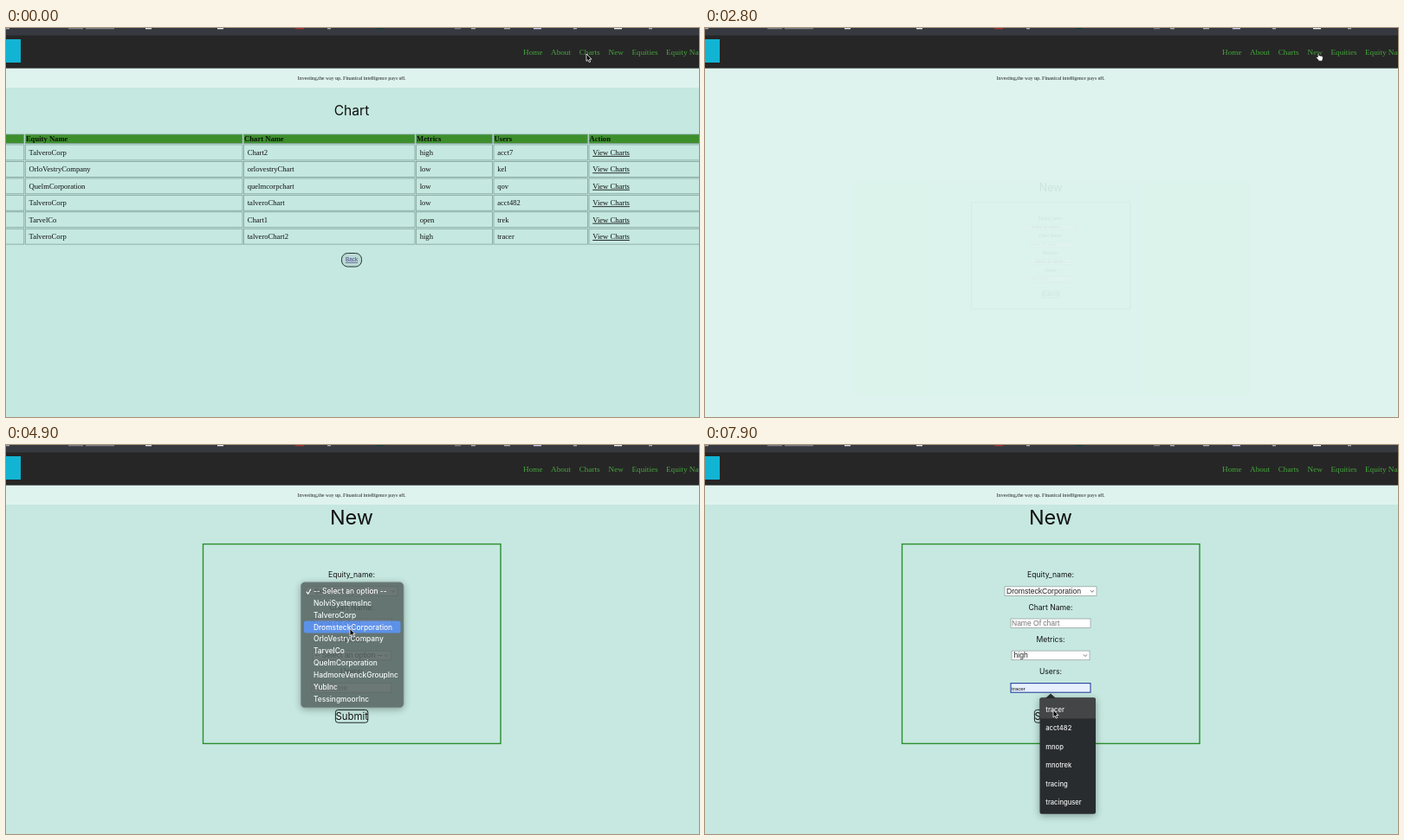
Recreate the animation shown at these times as an HTML page. Size 800 px wide and 450 px high, loop 8000 ms.

```html
<!DOCTYPE html>
<html lang="en">
<head>
<meta charset="utf-8">
<title>Equity charts</title>
<style>
html, body { margin: 0; width: 100%; height: 100%; overflow: hidden; background: #c5e8e0; }
svg { display: block; width: 100vw; height: 100vh; }
text { white-space: pre; }
.serif { font-family: "Liberation Serif", serif; }
.sans { font-family: "Liberation Sans", sans-serif; }
.ui { font-family: Inter, sans-serif; }
.mid { text-anchor: middle; }
.bold { font-weight: 700; }
.med { font-weight: 500; }
.link { text-decoration: underline; }
.pop { filter: drop-shadow(0 2px 4px rgba(0, 0, 0, .35)); }
</style>
</head>
<body>
<svg id="stage" viewBox="0 0 800 450" preserveAspectRatio="none"></svg>
<script>
const LOOP = 8000, STEP = 100;
const PROMPT = '-- Select an option --';
const PITCH = 13.83;

const rect = (x, y, w, h, fill, more = '') =>
  `<rect x="${x}" y="${y}" width="${w}" height="${h}" fill="${fill}" ${more}/>`;
const text = (x, y, size, cls, fill, str, id = '') =>
  `<text x="${x}" y="${y}" font-size="${size}" class="${cls}" fill="${fill}" ${id && `id="${id}"`}>${str}</text>`;
const group = (id, body, more = '') => `<g id="${id}" ${more}>${body}</g>`;

function topBar() {
  const dim = '#a9adb1';
  const bits = [[0, 4, dim], [72, 17, '#7c8084'], [92, 33, '#7c8084'], [161, 7, '#e4e4e4'], [244, 7, '#eeeeee'],
    [334, 10, '#a83232'], [371, 4, dim], [428, 8, '#123c3a'], [518, 7, '#6f7c80'], [537, 5, dim],
    [575, 7, dim], [609, 9, '#c8cdf0'], [655, 4, dim], [702, 9, '#eeeeee'], [742, 4, dim]];
  const nav = [[597, 'Home'], [629, 'About'], [661.7, 'Charts'], [695.5, 'New'], [722.5, 'Equities'], [762, 'Equity Name']];
  return rect(0, 0, 800, 9, '#363a40') +
    bits.map(([x, w, c]) => rect(x, 0, w, 1.3, c)).join('') +
    rect(0, 8.5, 800, 38.3, '#262626') +
    rect(-10, 13, 27, 27, '#12b4d4') +
    nav.map(([x, s]) => text(x, 31, 9.2, 'serif', '#45a53c', s)).join('') +
    rect(0, 46.8, 800, 22.2, '#dff3ee') +
    text(399, 60, 5.6, 'serif bold mid', '#555f5c', 'Investing,the way up. Finanical intelligence pays off.');
}

function tablePage() {
  const cols = [-30, 22.3, 274.5, 473.5, 563, 673, 840];
  const heads = ['', 'Equity Name', 'Chart Name', 'Metrics', 'Users', 'Action'];
  const rows = [
    ['TalveroCorp', 'Chart2', 'high', 'acct7'],
    ['OrloVestryCompany', 'orlovestryChart', 'low', 'kel'],
    ['QuelmCorporation', 'quelmcorpchart', 'low', 'qov'],
    ['TalveroCorp', 'talveroChart', 'low', 'acct482'],
    ['TarvelCo', 'Chart1', 'open', 'trek'],
    ['TalveroCorp', 'talveroChart2', 'high', 'tracer']
  ];
  const line = 'stroke="#82a29a" stroke-width=".8"';
  let out = rect(0, 69, 800, 381, '#c5e8e0') + text(399, 101.3, 15.6, 'ui mid', '#111', 'Chart');
  heads.forEach((h, c) => {
    const x = cols[c], w = cols[c + 1] - x - 1.5;
    out += rect(x, 123, w, 10.6, '#3d8f2c', line) + text(x + .6, 131.2, 8.6, 'serif bold', '#0c140a', h);
    rows.forEach((r, i) => {
      const y = 135 + i * 19.45, s = c === 5 ? 'View Charts' : r[c - 1] || '';
      out += rect(x, y, w, 17.9, 'none', line) +
        text(x + 4.2, y + 11.9, 8.6, c === 5 ? 'serif link' : 'serif', '#111', s);
    });
  });
  return out + rect(387.5, 260.5, 23, 15.6, '#b9dbd3', 'rx="7" stroke="#26332f"') +
    text(399, 270.4, 6.4, 'sans mid link', '#4a3a8c', 'Back');
}

function field(x, y, w, id = '') {
  return rect(x, y, w, 10.6, '#fff', `stroke="#8d9b97" stroke-width=".7" ${id && `id="${id}"`}`);
}

function select(x, y, w, tx, id) {
  const ax = x + w - 5;
  return field(x, y, w) + text(tx, y + 8.3, 8.6, 'sans', '#222', PROMPT, id) +
    `<path d="M${ax - 2} ${y + 4.3}l2 2.2 2-2.2" fill="none" stroke="#555" stroke-width=".8"/>`;
}

function formPage() {
  const label = (y, s) => text(399, y, 8.6, 'ui mid', '#111', s);
  return rect(-30, 69, 859, 465, '#c6e8e0', 'rx="14"') +
    text(399, 91.5, 23.4, 'ui mid', '#111', 'New') +
    rect(227.5, 114.6, 343.5, 230.8, 'none', 'stroke="#2a8f2c" stroke-width="1.4"') +
    label(153, 'Equity_name:') + select(346, 163.8, 106, 348, 'equity') +
    label(190.5, 'Chart Name:') + field(353, 201, 92) + text(354, 209.2, 8.5, 'sans', '#757575', 'Name Of chart') +
    label(227.8, 'Metrics:') + select(354, 238.1, 90, 356.5, 'metric') +
    label(265, 'Users:') + field(353, 275.6, 92, 'userBox') + text(354, 283.8, 8.5, 'sans', '#757575', 'user name', 'userText') +
    rect(380.4, 306.4, 37.4, 14.8, '#c9e9e2', 'rx="3" stroke="#1c2624"') +
    text(399.3, 317.9, 11.4, 'ui mid', '#111', 'Submit');
}

function menu(id, x, y, w, tx, items) {
  const h = items.length * PITCH + 6.6;
  return group(id,
    rect(x, y, w, h, '#53615f', 'rx="4.5" stroke="#75827f" stroke-width=".7"') +
    rect(x + 3.5, y + 3.3, w - 7, PITCH, '#4a83ea', `rx="2.5" id="${id}Row"`) +
    `<path d="M${tx - 8.3} ${y + 10.8}l2 2.5 3.2-5.2" fill="none" stroke="#fff" stroke-width="1.1"/>` +
    items.map((s, i) => text(tx, y + 13.3 + i * PITCH, 8.4, 'ui med', '#fff', s)).join(''), 'class="pop"');
}

function suggestions() {
  const names = ['tracer', 'acct482', 'mnop', 'mnotrek', 'tracing', 'tracinguser'];
  return group('users',
    '<path d="M393 293l6-5.5 6 5.5z" fill="#292c2f"/>' +
    rect(386.5, 292.3, 64.5, 134.5, '#292c2f', 'rx="2"') +
    rect(386.5, 293, 64.5, 23.5, '#434547', 'id="usersRow"') +
    names.map((s, i) => text(393.3, 308.6 + i * 21.55, 7.6, 'ui med', '#f2f2f2', s)).join(''), 'class="pop"');
}

const equities = [PROMPT, 'NolviSystemsInc', 'TalveroCorp', 'DromsteckCorporation', 'OrloVestryCompany',
  'TarvelCo', 'QuelmCorporation', 'HadmoreVenckGroupInc', 'YubInc', 'TessingmoorInc'];
const metrics = [PROMPT, 'high', 'low', 'open', 'price'];

document.getElementById('stage').innerHTML =
  rect(0, 0, 800, 450, '#def3ed') +
  group('table', tablePage()) + group('form', formPage()) + topBar() +
  menu('eqMenu', 340.4, 158.8, 118.6, 355, equities) +
  menu('meMenu', 349, 233.4, 107.4, 363.5, metrics) +
  suggestions() +
  group('cursor',
    '<path id="arrow" d="M0 0V8.4L1.9 6.7 3.2 9.6 4.7 9 3.4 6.1H6z" fill="#000" stroke="#fff" stroke-width=".8"/>' +
    '<path id="hand" d="M1.2 .8Q2.4-.2 2.8 1.2V3.6Q4 2.8 4.5 3.8 5.6 3.2 6 4.2 7.3 3.8 7.3 5.2V7Q6.8 8 6.6 9.7H2.6Q2.2 8.3-.6 5.8-.4 4.2 1.2 5.4z" fill="#fff" stroke="#111" stroke-width=".7"/>');

const $ = Object.fromEntries([...document.querySelectorAll('[id]')].map(e => [e.id, e]));
const show = (el, on) => el.setAttribute('visibility', on ? 'visible' : 'hidden');
const clamp = v => Math.max(0, Math.min(1, v));

// CSS "ease" curve, solved by bisection
function ease(x) {
  const curve = (a, b, u) => 3 * a * u * (1 - u) ** 2 + 3 * b * u * u * (1 - u) + u ** 3;
  let lo = 0, hi = 1;
  for (let i = 0; i < 24; i++) {
    const m = (lo + hi) / 2;
    if (curve(.25, .25, m) < x) lo = m; else hi = m;
  }
  return x <= 0 ? 0 : x >= 1 ? 1 : curve(.1, 1, lo);
}

const route = [[0, 670, 30], [500, 670, 30], [900, 711, 18], [1300, 709, 27], [1900, 709, 27], [2100, 706, 28.5],
  [2800, 706, 28.5], [3100, 469, 128.5], [3600, 411, 165.5], [4200, 411, 165.5], [4700, 397, 212.5], [5000, 397, 212.5],
  [5500, 400, 243], [5600, 400, 243], [5900, 395, 254], [6000, 395, 254], [6100, 395, 255.5], [6400, 395, 255.5],
  [6900, 405, 280], [7300, 405, 280], [7700, 403, 303], [7900, 402, 306.5]];

function cursorAt(t) {
  const i = route.findIndex(p => p[0] > t);
  if (i < 0) return route[route.length - 1].slice(1);
  const [t0, x0, y0] = route[i - 1], [t1, x1, y1] = route[i];
  const k = (t - t0) / (t1 - t0), e = k * k * (3 - 2 * k);
  return [x0 + (x1 - x0) * e, y0 + (y1 - y0) * e];
}

function drawMenu(id, top, count, t, open, close, y) {
  const fade = 1 - clamp((t - close) / 200);
  show($[id], t >= open && fade > 0);
  $[id].setAttribute('opacity', fade);
  const row = Math.max(0, Math.min(count - 1, Math.floor((y - top - 3.3) / PITCH)));
  $[id + 'Row'].setAttribute('y', top + 3.3 + row * PITCH);
}

function draw(ms) {
  const t = Math.floor((ms % LOOP) / STEP) * STEP;
  const [x, y] = cursorAt(t);

  const grow = ease((t - 2750) / 615), s = .5 + grow / 2;
  show($.table, t < 2800);
  show($.form, t >= 2800);
  $.form.setAttribute('opacity', grow);
  $.form.setAttribute('transform', `translate(399.3 301.6) scale(${s}) translate(-399.3 -301.6)`);

  $.equity.textContent = t < 5000 ? PROMPT : equities[3];
  $.metric.textContent = t < 6500 ? PROMPT : metrics[1];
  drawMenu('eqMenu', 158.8, equities.length, t, 3800, 4870, y);
  drawMenu('meMenu', 233.4, metrics.length, t, 5700, 6370, y);

  const focus = t >= 7100, filled = t >= 7900;
  $.userBox.setAttribute('stroke', focus ? '#26439c' : '#8d9b97');
  $.userBox.setAttribute('stroke-width', focus ? 1.1 : .7);
  $.userBox.setAttribute('fill', filled ? '#e8f0fe' : '#fff');
  $.userText.textContent = filled ? 'tracer' : 'user name';
  $.userText.setAttribute('font-size', filled ? 6.2 : 8.5);
  $.userText.setAttribute('fill', filled ? '#111' : '#757575');
  show($.users, t >= 7200);
  show($.usersRow, t >= 7200 && y > 293);

  const hand = t >= 2400 && t < 2900;
  show($.arrow, !hand);
  show($.hand, hand);
  $.cursor.setAttribute('transform', `translate(${x} ${y})`);
}

const start = performance.now();
function tick() {
  draw(performance.now() - start);
  requestAnimationFrame(tick);
}
tick();
</script>
</body>
</html>
```
